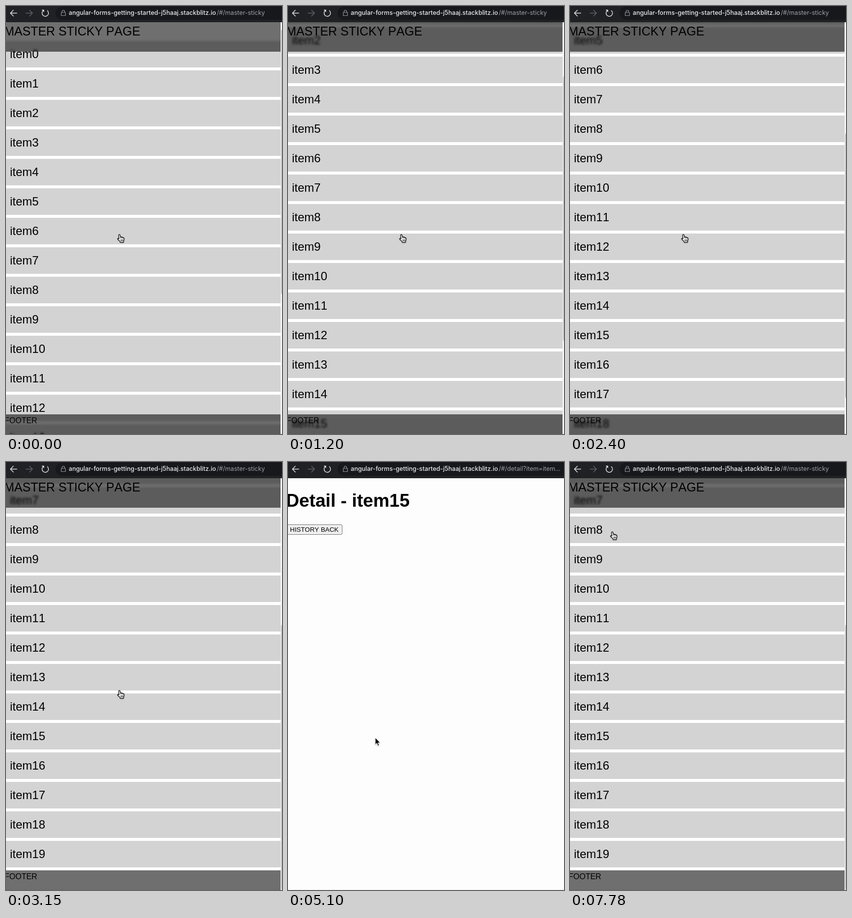
An HTML page for the animation above (8000 ms loop, 563 px wide and 871 px high).

```html
<!DOCTYPE html>
<html lang="en">
<head>
<meta charset="utf-8">
<title>Sticky list</title>
<style>
html, body { margin: 0; width: 100%; height: 100%; overflow: hidden; background: #fdfdfd; }
#stage { position: absolute; left: 0; top: 0; width: 563px; height: 871px; overflow: hidden;
  font-family: "Liberation Sans", Arial, sans-serif; font-kerning: none; color: #000; white-space: nowrap; }
#stage div { position: absolute; box-sizing: border-box; }
#bar { left: 0; top: 0; width: 563px; height: 33px; background: #202125; }
#pill { left: 101px; top: 1px; width: 480px; height: 27px; border-radius: 14px; background: #17181c; }
#bar svg { position: absolute; left: 0; top: 0; }
.url { top: 4px; line-height: 20px; font: 500 12.6px/20px Inter, "Liberation Sans", sans-serif; }
#host { left: 128px; color: #e8eaed; }
#path { left: 430px; color: #9aa0a6; font-weight: 400; }
.page { left: 0; top: 33px; width: 563px; height: 838px; overflow: hidden; }
#list { left: 0; top: 38px; width: 560px; }
.item { left: 0; width: 560px; height: 54px; padding-left: 8px; background: #d3d3d3; font-size: 24px; line-height: 54px; }
.sticky { left: 0; width: 560px; background: rgba(0,0,0,.565); backdrop-filter: blur(2px); }
.sticky div { left: -4px; }
#head { top: 0; height: 60px; }
#head div { font-size: 25px; line-height: 37px; }
#foot { top: 798px; height: 40px; }
#foot div { left: -3px; font-size: 16px; line-height: 25px; }
#track { left: 560px; top: 0; width: 3px; height: 838px; background: #f4f4f4; }
#thumb { left: 1px; top: 0; width: 9px; height: 540px; border-radius: 4px; background: #c4c4c4; }
#master { background: #fff; }
#detail { background: #fdfdfd; }
#title { left: -4px; top: 25px; font-size: 37.2px; font-weight: bold; line-height: 40px; }
#back { left: -5px; top: 94px; width: 116px; height: 21px; padding-left: 8px; border: 1px solid #767676;
  border-radius: 3px; background: #efefef; font-size: 13.33px; line-height: 19px; }
#edge { left: 0; top: 870px; width: 563px; height: 1px; background: rgba(0,0,0,.06); }
.cursor { position: absolute; left: 0; top: 0; overflow: visible; filter: drop-shadow(0 1px 1px rgba(0,0,0,.3)); }
</style>
</head>
<body>
<div id="stage">
  <div class="page" id="master">
    <div id="list"></div>
    <div class="sticky" id="head"><div>MASTER STICKY PAGE</div></div>
    <div class="sticky" id="foot"><div>FOOTER</div></div>
    <div id="track"><div id="thumb"></div></div>
  </div>
  <div class="page" id="detail">
    <div id="title">Detail - item15</div>
    <div id="back">HISTORY BACK</div>
  </div>
  <div id="edge"></div>
  <div id="bar">
    <div id="pill"></div>
    <svg width="130" height="33" fill="none" stroke-width="1.5" stroke-linecap="round" stroke-linejoin="round">
      <path d="M22 14.5H9M15 8.5L9 14.5L15 20.5" stroke="#dfe1e5"/>
      <path d="M41 14.5H54M48 8.5L54 14.5L48 20.5" stroke="#5f6368"/>
      <path d="M76 9.3A6.6 6.6 0 1 0 84.5 9.5M73.8 8.2H77V11.6" stroke="#dfe1e5"/>
      <path d="M112.7 13H121.3V19.5H112.7ZM114.5 13V11A2.5 2.5 0 0 1 119.5 11V13" stroke="#8f9499" stroke-width="1.2"/>
    </svg>
    <div class="url" id="host">angular-forms-getting-started-j5haaj.stackblitz.io</div>
    <div class="url" id="path"></div>
  </div>
  <svg class="cursor" id="hand" width="16" height="19" stroke="#000" stroke-linejoin="round" stroke-linecap="round">
    <path fill="#fff" stroke-width="1.2" d="M4.2 9.8L3.4 3Q3.2 1.2 4.6 1.1Q6 1 6.3 2.6L7 6.4Q7.6 5.4 8.8 5.8Q9.6 6 9.7 6.9Q10.6 6 11.7 6.6Q12.3 7 12.3 7.7Q14.2 7.2 14.4 9Q14.6 11.5 13.4 14L13.2 16.8H6.6Q6.3 15 4.8 13.6L1.6 10.8Q.6 9.6 1.6 8.9Q2.6 8.5 4.2 9.8Z"/>
    <path fill="none" stroke-width=".9" d="M7 6.4L7.3 8.6M9.7 6.9V8.8M12.3 7.7V9.2M7.7 11.2V14.4M9.7 11.2V14.4M11.6 11.2V14.4"/>
  </svg>
  <svg class="cursor" id="arrow" width="13" height="19">
    <path fill="#000" stroke="#fff" stroke-width="1" d="M0 0V14.2L3.3 11.2L5.6 16.6L8 15.6L5.7 10.3H10Z"/>
  </svg>
</div>
<script>
const $ = id => document.getElementById(id);
const LOOP = 8000;
const scrollKeys = [[0, 0], [1, 8], [2, 21], [3, 38], [4, 59], [11, 215], [16, 328], [21, 440]];
const rest = [231, 465], row = [178, 561], button = [86, 142];

$("list").innerHTML = Array.from({ length: 20 }, (_, i) =>
  `<div class="item" style="top:${i * 60}px">item${i}</div>`).join("");

// number of steps done at time t
const steps = (t, start, gap, count) =>
  Math.max(0, Math.min(count, Math.floor((t - start) / gap) + 1));

function scrollAt(n) {
  const i = Math.max(1, scrollKeys.findIndex(k => k[0] >= n));
  const [n0, s0] = scrollKeys[i - 1], [n1, s1] = scrollKeys[i];
  return Math.round(s0 + (s1 - s0) * (n - n0) / (n1 - n0));
}

const ease = p => p * p * (3 - 2 * p);
const mix = (a, b, p) => a.map((v, i) => Math.round(v + (b[i] - v) * p));

function place(el, [x, y], dx, dy, on) {
  el.style.transform = `translate(${x + dx}px,${y + dy}px)`;
  el.style.visibility = on ? "visible" : "hidden";
}

function draw(t) {
  const detail = t >= 5100 && t < 7780;
  const s = scrollAt(steps(t, 150, 150, 21));
  $("list").style.transform = `translateY(${-s}px)`;
  $("thumb").style.transform = `translateY(${14 + s * .645}px)`;

  const toRow = ease(steps(t, 3750, 150, 6) / 6);
  const n = t >= 7030 ? 8 : steps(t, 6000, 150, 7);
  const pos = t < 6000 ? mix(rest, row, toRow) : mix(row, button, ease(n / 8));

  $("detail").style.visibility = detail ? "visible" : "hidden";
  $("master").style.visibility = detail ? "hidden" : "visible";
  $("path").textContent = detail ? "/#/detail?item=item..." : "/#/master-sticky";
  $("back").style.background = pos[1] < 148 ? "#e5e5e5" : "#efefef";
  place($("hand"), pos, -4.5, -1, !detail);
  place($("arrow"), pos, 0, 0, detail);
}

const start = performance.now();
function tick() {
  draw((performance.now() - start) % LOOP);
  requestAnimationFrame(tick);
}
draw(0);
requestAnimationFrame(tick);
</script>
</body>
</html>
```
